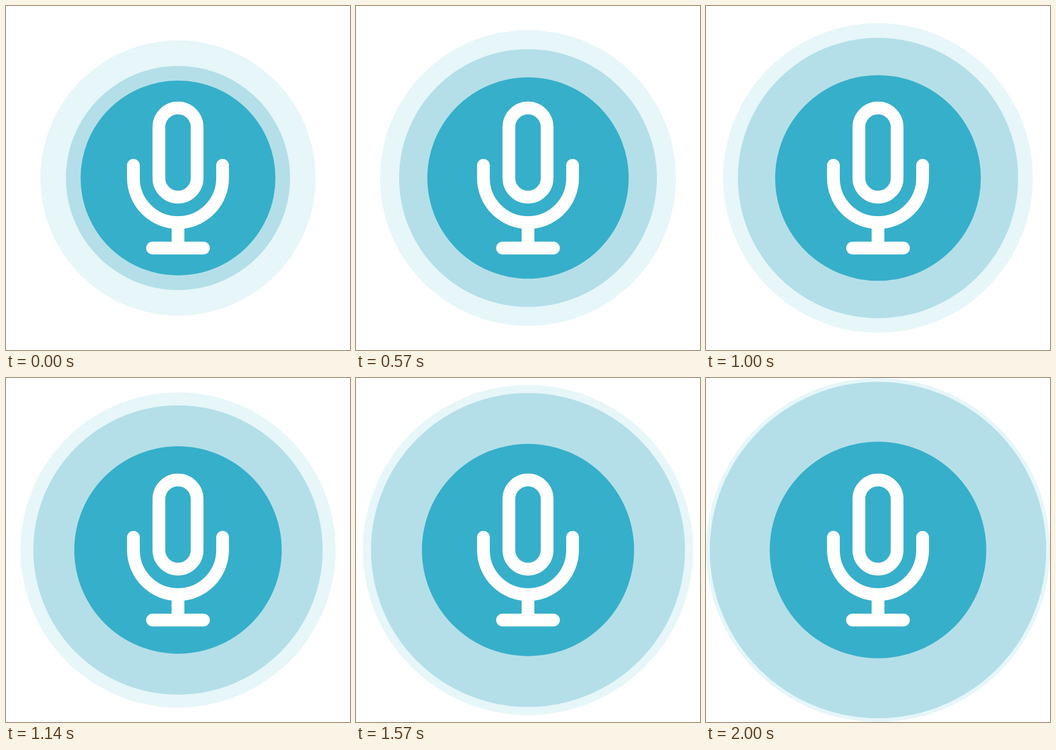
Recreate the animation shown at these times as an HTML page. Size 640 by 640 pixels, loop 2.07 s.

```html
<!DOCTYPE html>
<html lang="en">
<head>
<meta charset="utf-8">
<title>Pulsing microphone</title>
<style>
html, body { margin: 0; height: 100%; overflow: hidden; background: #fff; }
svg { display: block; width: 100vw; height: 100vh; }
</style>
</head>
<body>
<svg viewBox="-320 -320 640 640">
  <circle id="halo" fill="#e6f6f9"/>
  <circle id="ring" fill="#b4dfe8"/>
  <circle id="disc" fill="#36afca"/>
  <g transform="scale(11.85)" fill="none" stroke="#fff" stroke-width="2" stroke-linecap="round">
    <rect x="-3" y="-11" width="6" height="14" rx="3"/>
    <path d="M-7-2V0A7 7 0 0 0 7 0V-2M0 7V11M-4 11H4"/>
  </g>
</svg>
<script>
const LOOP = 2070;
// Radius at the start and its growth per second
const circles = { halo: [256, 32], ring: [208.5, 52.25], disc: [181.25, 10.1] };

function draw(now) {
  const t = now % LOOP;
  // 14 steps per second, each showing the next pose on a 25 per second grid
  const step = Math.floor((Math.floor(t / 10) + 0.5) * 0.14);
  const seconds = Math.ceil(step * 25 / 14) / 25;
  for (const [id, [start, growth]] of Object.entries(circles))
    document.getElementById(id).setAttribute("r", start + growth * seconds);
}

const begin = performance.now();
function tick() {
  draw(performance.now() - begin);
  requestAnimationFrame(tick);
}
tick();
</script>
</body>
</html>
```
